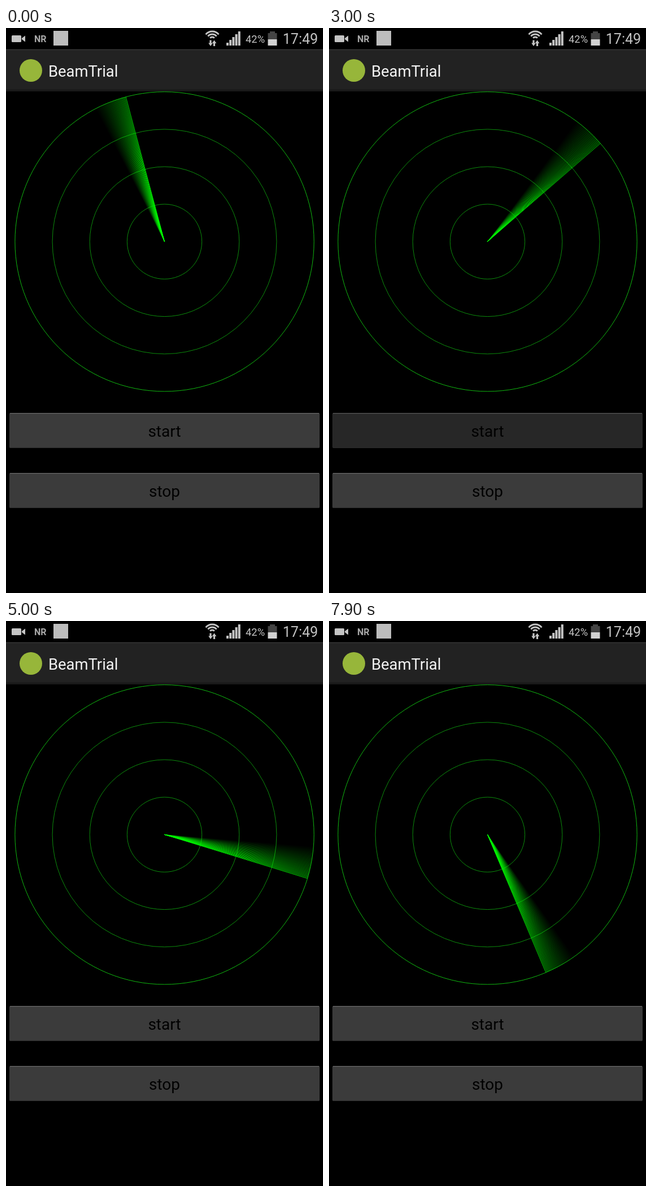
Write an HTML page that moves like this. It is 561 px wide and 998 px high and loops after 8 s.

```html
<!DOCTYPE html>
<html lang="en">
<head>
<meta charset="utf-8">
<title>Radar sweep</title>
<style>
  html, body { margin: 0; width: 100%; height: 100%; overflow: hidden; background: #000; }
  svg { display: block; width: 100%; height: 100%; font-family: Roboto, "Noto Sans", sans-serif; }
  .face { fill: #3b3b3b; }
  .edge { fill: #6c6c6c; }
  .pressed .face { fill: #272727; }
  .pressed .edge { fill: #5a5a5a; }
  .ring { fill: none; stroke: #14e014; stroke-width: 1; }
</style>
</head>
<body>
<svg viewBox="0 0 561 998">
  <rect width="561" height="998"/>

  <g fill="#c4c4c4">
    <rect x="10" y="13" width="17" height="12" rx="1.5"/>
    <path d="M28 18 34 13.500V24.500L28 20Z"/>
    <text x="50" y="25" font-size="16" font-weight="700" fill="#a9a9a9">NR</text>
    <rect x="84" y="5" width="26" height="26" fill="#bdbdbd"/>
    <g id="wifi" fill="none" stroke="#c4c4c4" stroke-width="2.800"></g>
    <path d="M360.400 21.500h3.200v5h2.200l-3.800 5.500-3.800-5.500h2.200z"/>
    <path id="up" d="M366.900 32h3.200v-5h2.200l-3.800-5.500-3.800 5.500h2.200z"/>
    <g id="signal"></g>
    <text x="424" y="26" font-size="18.400">42%</text>
    <path d="M467 6h9v3h3.500v11h-16V9h3.500z" fill="#444"/>
    <rect x="463.500" y="20" width="16" height="11" fill="#d2d2d2"/>
    <text x="489.800" y="28" font-size="25">17:49</text>
  </g>

  <rect y="38" width="561" height="74" fill="#222"/>
  <rect y="37.500" width="561" height="1.500" fill="#363636"/>
  <rect y="108.500" width="561" height="3.500" fill="#191919"/>
  <circle cx="44" cy="75" r="20" fill="#97b63a"/>
  <text x="75" y="85.500" font-size="27.400" fill="#f3f3f3">BeamTrial</text>

  <g id="radar" transform="translate(280.500 377.300)">
    <g id="sweep" stroke="#00ff00" stroke-width=".8"></g>
  </g>
  <g id="buttons"></g>
</svg>
<script>
const NS = 'http://www.w3.org/2000/svg';
const $ = id => document.getElementById(id);

function add(parent, tag, attrs, text) {
  const el = document.createElementNS(NS, tag);
  for (const key in attrs) el.setAttribute(key, attrs[key]);
  if (text) el.textContent = text;
  parent.appendChild(el);
  return el;
}

const LOOP = 8000, STEP = 100;
const RADIUS = 264.6;
const TRAIL = 25;

// [ms, degrees clockwise from north]
const PATH = [
  [0, -15], [1600, 31], [2200, 49], [3000, 49], [4300, 86.5],
  [5700, 127.5], [6200, 141], [7340, 141], [7900, 157]
];

function addButton(label, y) {
  const g = add($('buttons'), 'g', { transform: `translate(6 ${y})` });
  add(g, 'rect', { class: 'face', width: 549, height: 62, rx: 2 });
  add(g, 'rect', { class: 'edge', x: 1, width: 547, height: 1.2 });
  add(g, 'rect', { y: 61, x: 1, width: 547, height: 1, fill: '#2c2c2c' });
  add(g, 'text', { x: 274.5, y: 42, 'font-size': 28, 'text-anchor': 'middle' }, label);
  return g;
}

for (const r of [5, 10, 15]) {
  const dx = r * Math.sin(0.87), y = 21 - r * Math.cos(0.87);
  add($('wifi'), 'path', { d: `M${365 - dx} ${y}A${r} ${r} 0 0 1 ${365 + dx} ${y}` });
}
for (let i = 0; i < 5; i++) {
  const h = 5 + i * 5;
  add($('signal'), 'rect', { x: 390 + i * 5.2, y: 31 - h, width: 4, height: h });
}
for (let i = 1; i <= 4; i++) {
  const ring = add($('radar'), 'circle', { class: 'ring', r: RADIUS * i / 4, opacity: i === 4 ? 0.82 : 0.62 });
  $('radar').insertBefore(ring, $('sweep'));
}
for (let i = TRAIL - 1; i >= 0; i--) {
  add($('sweep'), 'line', { y2: -RADIUS, opacity: 1 - i / TRAIL, transform: `rotate(${-i / 2})` });
}
const start = addButton('start', 680);
const stop = addButton('stop', 786);

function angleAt(t) {
  const next = PATH.findIndex(p => p[0] > t);
  if (next < 0) return PATH[PATH.length - 1][1];
  const [t0, a0] = PATH[next - 1], [t1, a1] = PATH[next];
  const angle = a0 + (a1 - a0) * (t - t0) / (t1 - t0);
  return Math.round(angle * 2) / 2;
}

const within = (t, from, to) => t >= from && t < to;

function draw(ms) {
  const t = Math.floor(ms % LOOP / STEP) * STEP;
  $('sweep').setAttribute('transform', `rotate(${angleAt(t)})`);
  start.classList.toggle('pressed', within(t, 3000, 3100) || within(t, 7300, 7400));
  stop.classList.toggle('pressed', within(t, 2100, 2200) || within(t, 6100, 6200));
  $('up').setAttribute('fill', within(t, 5200, 6500) ? '#666' : '#c4c4c4');
}

let origin;
function tick(now) {
  if (origin === undefined) origin = now;
  draw(now - origin);
  requestAnimationFrame(tick);
}
draw(0);
requestAnimationFrame(tick);
</script>
</body>
</html>
```
